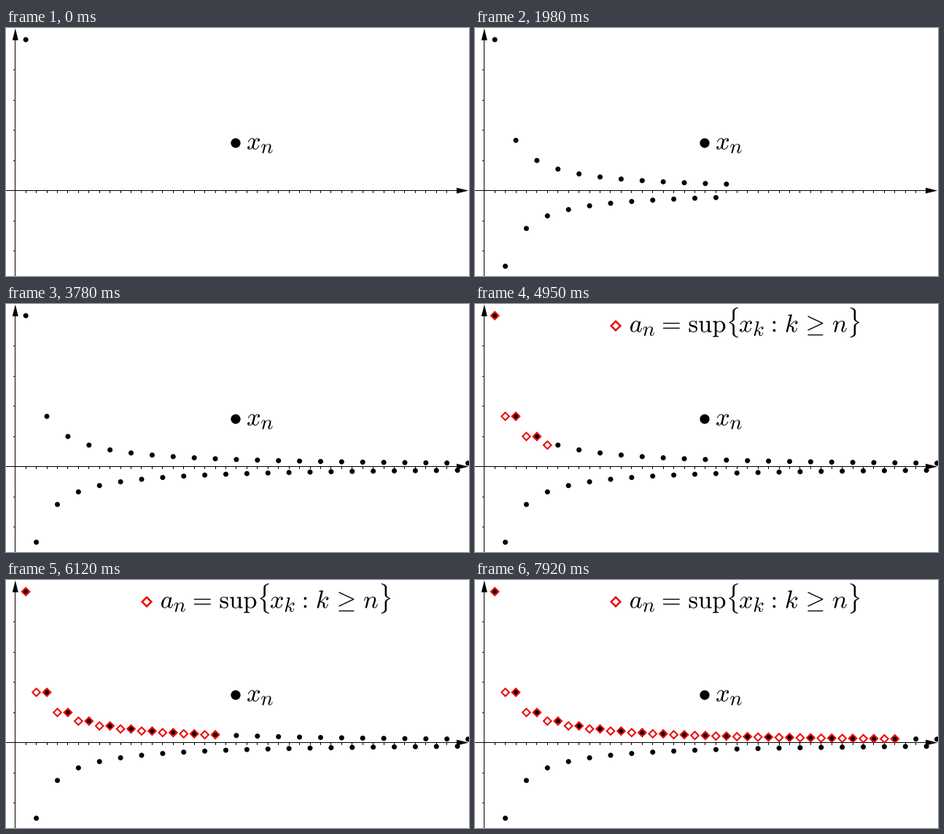
A matplotlib script that plays this animation: 635x341 px, repeating every 8 s.

```python
import matplotlib.pyplot as plt
from matplotlib.animation import FuncAnimation
from matplotlib.patches import Circle, PathPatch, Polygon
from matplotlib.textpath import TextPath
from matplotlib.transforms import Affine2D

plt.rcParams["mathtext.fontset"] = "cm"

W, H, DPI = 635, 341, 100
PX = 72 / DPI                   # one pixel in points
OX, OY = 12.7, 223.7            # origin of the graph
DX, AMP = 14.44, 207.7          # step in n, height of x_1
N_DOTS, N_SUP = 43, 39
EM = 34.6                       # label type size in pixels
SUB, DROP = 0.82, 0.15          # subscript scale, drop in em
REL = 0.176                     # em of space mathtext puts before a relation
TICK, LOOP = 20, 8000           # ms per drawn frame, ms per loop
STEP, SUP_START = 90, 4500      # ms per new point, start of a_n
RED = "#ee0000"

fig = plt.figure(figsize=(W / DPI, H / DPI), dpi=DPI, facecolor="white")
ax = fig.add_axes([0, 0, 1, 1])
ax.set_xlim(0, W)
ax.set_ylim(H, 0)
ax.axis("off")


def line(x0, y0, x1, y1):
    ax.plot([x0, x1], [y0, y1], color="black", lw=PX, snap=False,
            solid_capstyle="butt", scalex=False, scaley=False)


def dot(x, y, r):
    return ax.add_patch(Circle((x, y), r, fc="black", ec="none", zorder=3))


def diamond(x, y, r, width):
    pts = [(x - r, y), (x, y - r), (x + r, y), (x, y + r)]
    return ax.add_patch(Polygon(pts, fill=False, ec=RED, lw=width * PX,
                                joinstyle="miter", zorder=4))


def glyphs(x, y, tex, scale=1.0):
    path = TextPath((0, 0), f"${tex}$", size=EM * scale)
    path = path.transformed(Affine2D().scale(1, -1).translate(x, y))
    return ax.add_patch(PathPatch(path, fc="black", ec="none", zorder=5))


def formula(x, y, parts):
    """Place (offset in em, TeX, is subscript) parts on one baseline."""
    return [glyphs(x + off * EM, y + (DROP * EM if sub else 0), tex,
                   SUB if sub else 1.0)
            for off, tex, sub in parts]


def x_n(n):
    return (-1) ** (n + 1) / n


def a_n(n):
    return x_n(n) if n % 2 else x_n(n + 1)


def place(n, value):
    return OX + DX * n, OY - AMP * value


# axes, arrowheads and ticks
line(0, 223.5, 620, 223.5)
line(12.5, 14, 12.5, H)
for head in ([(634.3, 223.6), (618, 219.6), (618, 227.6)],
             [(12.8, 0.6), (8.8, 16.8), (16.8, 16.8)]):
    ax.add_patch(Polygon(head, fc="black", ec="none", snap=False))
for n in range(1, 42):
    x = int(OX + DX * n) + 0.5
    line(x, 223, x, 227)
for k in (-2, -1, 1, 2, 3, 4):
    y = int(OY - AMP / 5 * k) + 0.5
    line(10, y, 13, y)

# legends
dot(315, 158.2, 6.6)
formula(330, 167, [(0, "x", False), (0.56, "n", True)])
sup_legend = [diamond(193, 30, 6.3, 2.5)] + formula(211.7, 38.6, [
    (0, "a", False), (0.52, "n", True), (1.277 - REL, "=", False),
    (2.333, r"\mathrm{sup}", False), (3.839, r"\{", False),
    (4.339, "x", False), (4.9, "k", True), (5.604 - REL, ":", False),
    (6.160, "k", False), (6.988 - REL, r"\geq", False),
    (8.044, "n", False), (8.644, r"\}", False)])

dots = [dot(*place(n, x_n(n)), 3.5) for n in range(1, N_DOTS + 1)]
sups = [diamond(*place(n, a_n(n)), 5.3, 2) for n in range(1, N_SUP + 1)]


def show_first(items, count):
    for i, item in enumerate(items):
        item.set_visible(i < count)


def draw(frame):
    t = frame * TICK + TICK // 2
    show_first(dots, t // STEP + 1)
    sup_count = (t - SUP_START) // STEP + 1
    show_first(sups, sup_count)
    for item in sup_legend:
        item.set_visible(sup_count > 0)
    return dots + sups + sup_legend


anim = FuncAnimation(fig, draw, frames=LOOP // TICK, interval=TICK,
                     repeat=True, repeat_delay=0, blit=False)
plt.show()
```
